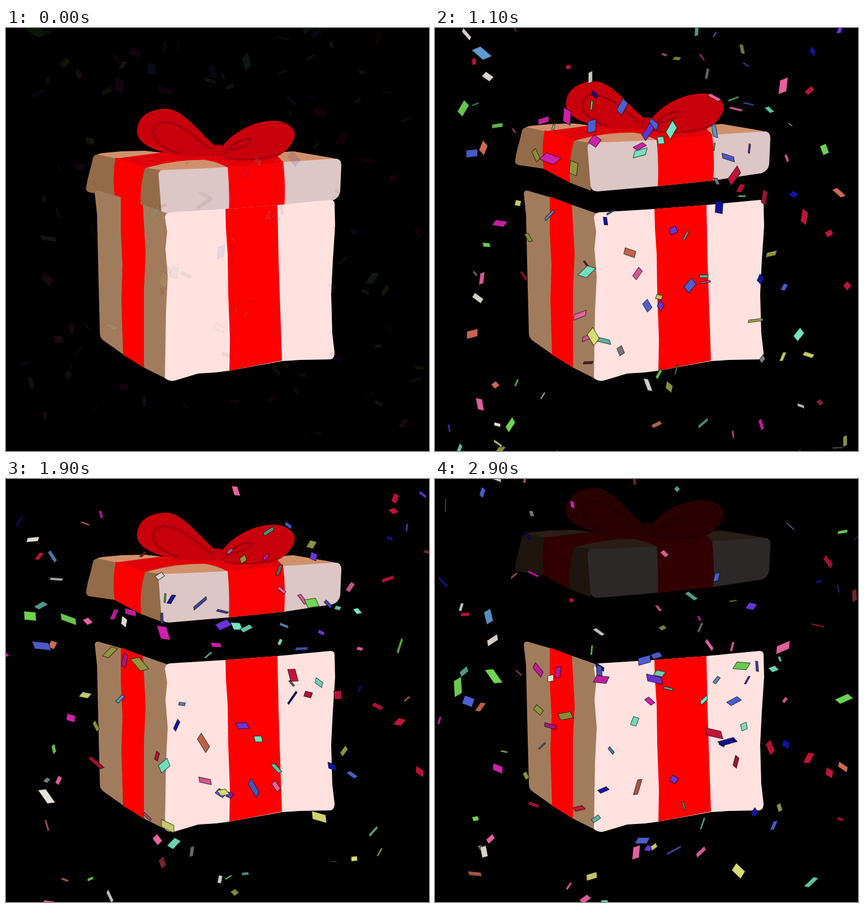
An HTML page for the animation above (3000 ms loop, 748x748 px).

```html
<!DOCTYPE html>
<html lang="en">
<head>
<meta charset="utf-8">
<title>Gift box</title>
<style>
html, body { margin: 0; width: 100%; height: 100%; overflow: hidden; background: #000; }
svg { display: block; width: 100vw; height: 100vh; }
</style>
</head>
<body>
<svg viewBox="0 0 748 748">
  <g id="lid">
    <path fill="#d0906c" d="M158 226Q162 222 172 221L205 218L245 217L290 222L420 224L508 218L578 230L588 234L490 240L392 249L275 254L190 236Z"/>
    <path fill="#936b48" d="M154 229Q157 222 168 225L196 231L246 247L272 251L276 336L239 322L192 297L150 291Q140 290 142 281Q144 266 149 250Z"/>
    <path fill="#ddc6c6" d="M270 263Q268 251 280 251L335 249L392 246L490 237L584 231Q593 232 593 243L591 289Q589 301 577 305L492 318L394 328L290 337Q277 338 275 328Z"/>
    <path fill="#e0000a" d="M193 231Q240 225 285 219L478 224L491 238L393 247Q370 235 350 233Q295 233 246 248Z"/>
    <path fill="#fc0000" d="M194 229L246 247Q235 285 239 322L192 297Q188 260 194 229Z"/>
    <path fill="#fa0000" d="M392 246L490 237Q495 275 492 318L394 328Q396 290 392 246Z"/>
    <g fill="#c8000c">
      <path d="M372 210C347 190 326 160 300 147C282 137 246 145 236 165C226 186 233 200 255 211C275 221 300 226 330 228L368 227Z"/>
      <path d="M384 207C404 183 440 163 476 164C501 166 514 181 510 193C505 210 490 226 465 232C440 237 400 235 382 228Z"/>
      <ellipse cx="375" cy="217" rx="13" ry="11"/>
    </g>
    <g fill="none" stroke="#a2000c" stroke-width="4" stroke-linecap="round">
      <path d="M362 215C336 196 320 175 291 168C268 162 256 176 262 192C267 205 288 217 304 221"/>
      <path d="M388 222C398 203 420 196 430 196C438 202 420 213 396 215"/>
      <path d="M386 230C425 236 462 231 486 222" stroke-width="3"/>
      <path d="M366 224Q365 208 376 207Q386 209 384 225" stroke-width="2"/>
    </g>
  </g>
  <path fill="#a17c5c" d="M157 293Q158 286 165 288L203 299L243 313L286 328L287 622L243 600L207 577L173 553Q166 548 166 540L163 420L161 330Z"/>
  <path fill="#f00" d="M203 298L242 313L247 400L244 460L244 600L207 578L204 480L206 420L203 360Z"/>
  <path fill="#ffe2e0" d="M281 335Q282 327 290 326L388 320L480 313L574 304Q581 304 581 311L582 350L578 410L575 470L577 540L581 574Q581 586 572 586L520 587L488 589L395 606L372 609L340 611L300 623Q289 626 281 619L283 500L286 440L282 390L285 360Z"/>
  <path fill="#f00" d="M388 320L480 313L482 410L488 588L395 606L396 550L393 470L392 400L389 355Z"/>
  <g id="confetti" stroke="#000" stroke-opacity=".55" stroke-width="1.3" stroke-linejoin="round"></g>
</svg>
<script>
const LOOP = 3000, STEP = 100;
const lid = document.getElementById('lid');
const layer = document.getElementById('confetti');

const colors = {
  green: [112, 214, 84], mint: [116, 226, 192], teal: [80, 158, 142], sky: [95, 155, 208],
  blue: [78, 96, 212], navy: [20, 18, 160], purple: [106, 54, 216], magenta: [208, 32, 170],
  pink: [232, 98, 160], red: [196, 20, 58], maroon: [122, 36, 50], orange: [208, 106, 82],
  yellow: [216, 220, 112], olive: [144, 150, 62], white: [232, 226, 218], gray: [126, 126, 130]
};
const names = Object.keys(colors);

// Large pieces: colour, place at mid-loop, drift in px per second
const large = [
  ['green', 536, 183, 4, 115], ['green', 697, 265, 16, 96], ['white', 77, 530, 3, 100],
  ['orange', 70, 585, 0, 88], ['blue', 62, 268, 0, 95], ['magenta', 225, 207, -5, 102],
  ['magenta', 190, 211, -4, 97], ['blue', 277, 220, 10, 92], ['purple', 380, 230, 8, 95],
  ['magenta', 284, 245, 3, 85], ['red', 518, 315, -22, 104], ['red', 588, 350, 0, 98],
  ['navy', 508, 360, 3, 82], ['blue', 444, 512, -18, 112], ['mint', 275, 478, 8, 95],
  ['mint', 299, 610, 2, 112], ['yellow', 281, 588, 0, 88], ['pink', 355, 497, 0, 125],
  ['orange', 350, 440, 3, 82], ['mint', 651, 592, 6, 95], ['yellow', 560, 567, -20, 98],
  ['pink', 614, 158, -2, 108], ['green', 46, 205, -5, 125], ['white', 94, 143, 2, 110],
  ['sky', 86, 102, 2, 110], ['green', 108, 220, 0, 98], ['mint', 420, 232, -3, 107],
  ['red', 161, 478, 7, 76], ['olive', 242, 297, -12, 95], ['blue', 340, 190, 22, 100],
  ['magenta', 205, 287, 2, 115]
];

let seed = 2417;
function rnd(a = 0, b = 1) {
  seed = (seed + 0x6d2b79f5) | 0;
  let n = Math.imul(seed ^ (seed >>> 15), 1 | seed);
  n = (n + Math.imul(n ^ (n >>> 7), 61 | n)) ^ n;
  return a + (b - a) * (((n ^ (n >>> 14)) >>> 0) / 4294967296);
}

function makePiece(color, x, y, vx, vy, long, wide) {
  const el = document.createElementNS('http://www.w3.org/2000/svg', 'path');
  layer.appendChild(el);
  return {
    el, rgb: colors[color], x, y, vx, vy, long, wide,
    turn: rnd(0, 6.28), spin: rnd(-2, 2),
    roll: rnd(0, 6.28), rollRate: rnd(1.5, 4),
    tip: rnd(0, 6.28), tipRate: rnd(1, 3),
    sway: rnd(2, 7), phase: rnd(0, 6.28)
  };
}

const pieces = [];
for (let i = 0; i < 132; i++) {
  pieces.push(makePiece(names[Math.floor(rnd(0, names.length))],
    rnd(-10, 758), rnd(-170, 910), rnd(-9, 9), rnd(78, 122), rnd(12, 24), rnd(6, 13)));
}
for (const p of large) pieces.push(makePiece(...p, rnd(23, 30), rnd(12, 16)));

function drawPiece(p, t) {
  const s = (t - 1600) / 1000;
  const x = p.x + p.vx * s + p.sway * Math.sin(2.4 * s + p.phase);
  const y = p.y + p.vy * s + p.sway * 0.4 * Math.cos(3 * s + p.phase);
  const a = p.turn + p.spin * s;
  const roll = Math.cos(p.roll + p.rollRate * s);
  const tip = Math.sin(p.tip + p.tipRate * s);
  const w = p.wide / 2 * (0.22 + 0.78 * Math.abs(roll));
  const l = p.long / 2 * (0.6 + 0.4 * Math.abs(tip));
  const lean = w * 0.55 * tip;
  const c = Math.cos(a), n = Math.sin(a);
  const at = (u, v) => (x + u * c - v * n).toFixed(1) + ' ' + (y + u * n + v * c).toFixed(1);
  p.el.setAttribute('d', 'M' + [at(-l + lean, -w), at(l + lean, -w), at(l - lean, w), at(-l - lean, w)].join('L') + 'Z');
  const shade = 0.7 + 0.3 * Math.abs(roll);
  p.el.setAttribute('fill', `rgb(${p.rgb.map(v => Math.round(v * shade))})`);
}

function draw(t) {
  lid.setAttribute('transform', `translate(0 ${(-0.0438 * t).toFixed(2)})`);
  lid.setAttribute('opacity', Math.min(1, (LOOP - t) / 500));
  layer.setAttribute('opacity', Math.min(1, 0.1 + t / 500));
  for (const p of pieces) drawPiece(p, t);
}

const start = performance.now();
let last = -1;
function tick() {
  const t = Math.floor((performance.now() - start) % LOOP / STEP) * STEP;
  if (t !== last) draw(last = t);
  requestAnimationFrame(tick);
}
tick();
</script>
</body>
</html>
```
